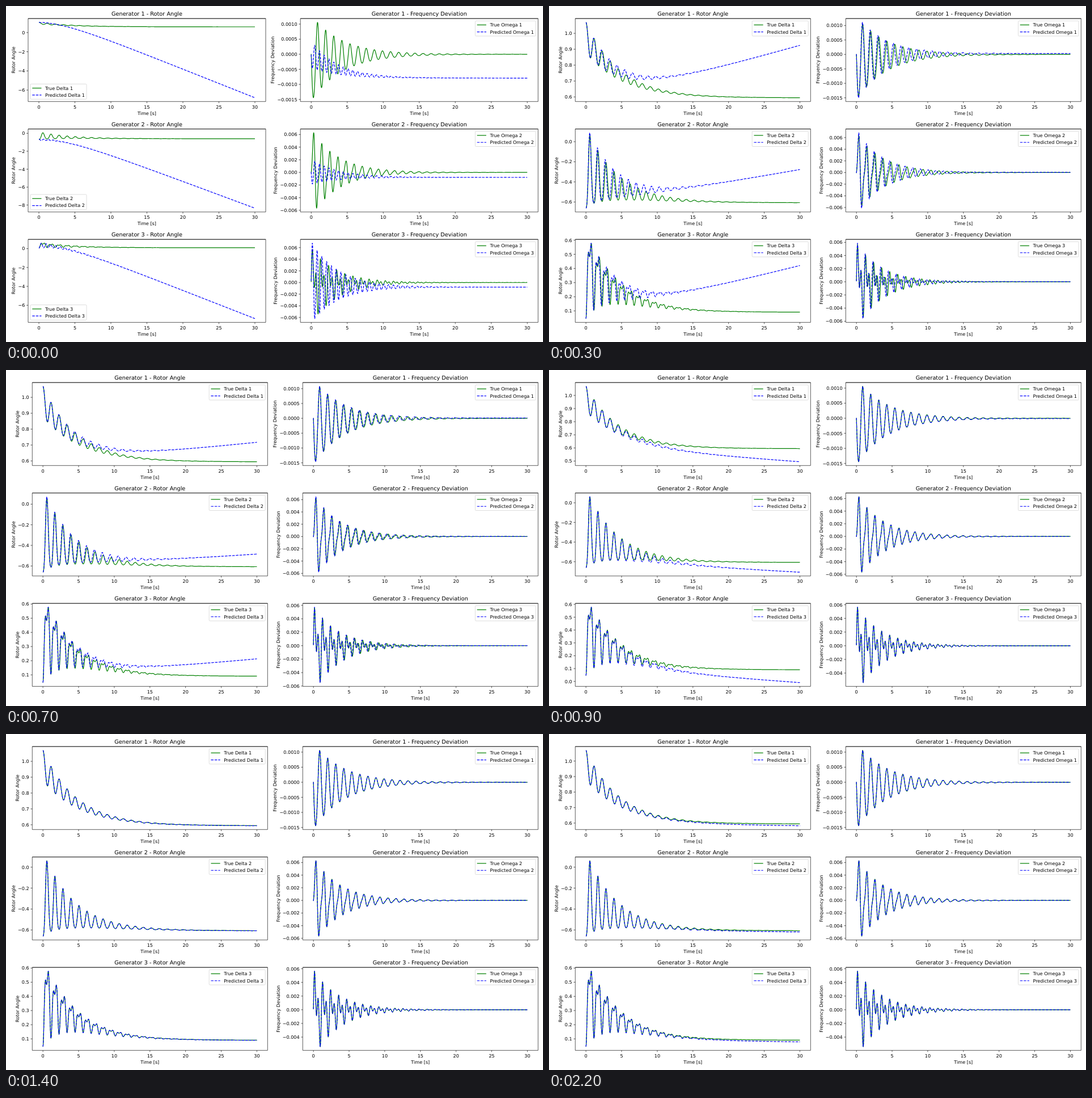
Write an HTML page with a canvas that moves like this. It is 947 by 592 pixels and loops after 7.2 s.

```html
<!DOCTYPE html>
<html lang="en">
<head>
<meta charset="utf-8">
<style>
  html, body { margin: 0; width: 100%; height: 100%; overflow: hidden; background: #fff; }
  canvas { display: block; }
</style>
</head>
<body>
<canvas id="stage" width="947" height="592"></canvas>
<script>
const ctx = document.getElementById('stage').getContext('2d');
const EM = 8.1, PT = 0.81, HEIGHT = 146.2, TOPS = [22.1, 216.7, 411.2];
const SPAN = 30, SAMPLES = 1000, SPEED = 377;
const W = 5.575;

// Damped terms: [amplitude, decay rate, frequency, phase]
const GENERATORS = [
  { rest: 0.594, gain: 0,
    real: [[0.38, 0.205, 0, 0], [0.097, 0.24, W, -0.25], [0.003, 0.24, 2 * W, 1.07]],
    rough: [[0.457, 0, 0, 0], [0.018, 0.27, 9.5, 0]] },
  { rest: -0.608, gain: 1,
    real: [[0.31, 0.185, 0, 0], [-0.4, 0.26, W, 0], [0.069, 0.32, 2 * W, 0.13], [-0.03, 1.5, 0, 0]],
    rough: [[0.11, 0, 0, 0], [-0.24, 0.2, 0, 0], [0.08, 0.27, 9.5, 0]] },
  { rest: 0.09, gain: 0,
    real: [[0.44, 0.21, 0, 0], [-0.117, 0.5, 0, 0], [-0.246, 0.29, W, -0.18], [-0.127, 0.27, 2 * W, 0.15]],
    rough: [[0.35, 0, 0, 0], [-0.12, 0.2, 0, 0], [-0.28, 0.27, 9.5, 0]] }
];

// Training progress: [step, drift at the end, tempo, share of the rough shape]
const KEYS = [
  [0, -7.85, 1.04, 1], [3, 0.33, 1.04, 0], [5, 0.345, 1.028, 0], [9, -0.1, 1, 0],
  [14, -0.001, 1, 0], [18, -0.064, 1, 0], [22, -0.012, 1, 0]
];

function progress(step) {
  const i = Math.max(1, KEYS.findIndex(k => k[0] >= step));
  const a = KEYS[i - 1], b = KEYS[i], u = (step - a[0]) / (b[0] - a[0]);
  return a.map((v, j) => v + (b[j] - v) * u);
}

const swing = (terms, t) => terms.reduce(
  (sum, [amp, rate, freq, phase]) => sum + amp * Math.exp(-rate * t) * Math.cos(freq * t + phase), 0);

// Drift that sets in gently and then grows linearly to 1 at the end
const LAG = 3.7;
const drift = t => (t - LAG * (1 - Math.exp(-t / LAG))) / (SPAN - LAG);

const slope = f => t => (f(t + 0.002) - f(t - 0.002)) / 0.004 / SPEED;
const sample = f => Array.from({ length: SAMPLES + 1 }, (_, i) => f(i * SPAN / SAMPLES));

function tickStep(range) {
  for (let e = -5; e < 3; e++)
    for (const m of [1, 2, 2.5, 5])
      if (range / (m * 10 ** e) <= 7.5)
        return { size: m * 10 ** e, decimals: Math.max(0, (m === 2.5 ? 1 : 0) - e) };
}

function makePanel(row, name, kind, real, guess) {
  const curves = [sample(real), sample(guess)];
  const all = curves.flat();
  let lo = Math.min(...all), hi = Math.max(...all);
  const pad = (hi - lo) * 0.05;
  lo -= pad;
  hi += pad;
  const { size, decimals } = tickStep(hi - lo);
  const ticks = [];
  for (let n = Math.ceil(lo / size); n <= hi / size; n++)
    ticks.push([n * size, (n < 0 ? '\u2212' : '') + Math.abs(n * size).toFixed(decimals)]);
  return { row, name, kind, curves, lo, hi, ticks, decimals };
}

function text(str, x, y, align = 'center', size = EM) {
  ctx.font = size + 'px "DejaVu Sans", sans-serif';
  ctx.textAlign = align;
  ctx.fillStyle = '#000';
  ctx.fillText(str, x, y);
}

function line(points, color, width, dashed) {
  ctx.strokeStyle = color;
  ctx.lineWidth = width;
  ctx.setLineDash(dashed ? [5.55 * PT, 2.4 * PT] : []);
  ctx.beginPath();
  points.forEach(([x, y]) => ctx.lineTo(x, y));
  ctx.stroke();
  ctx.setLineDash([]);
}

const curve = (points, second) => line(points, second ? '#00f' : '#008000', 1.5 * PT, second);
const thin = (...points) => line(points, '#000', 0.8 * PT);

function legend(panel, left, right, top, low) {
  const labels = ['True', 'Predicted'].map(w => `${w} ${panel.name} ${panel.row + 1}`);
  ctx.font = EM + 'px "DejaVu Sans", sans-serif';
  const w = ctx.measureText(labels[1]).width + 3.6 * EM, h = 26.8;
  const x = low ? left + 4.05 : right - 4.05 - w;
  const y = low ? top + HEIGHT - 4.05 - h : top + 4.05;
  ctx.beginPath();
  ctx.roundRect(x, y, w, h, 1.6);
  ctx.fillStyle = 'rgba(255,255,255,.8)';
  ctx.fill();
  ctx.strokeStyle = 'rgba(204,204,204,.8)';
  ctx.lineWidth = PT;
  ctx.stroke();
  labels.forEach((label, i) => {
    const ly = y + 7.2 + i * 12.3, lx = x + 0.4 * EM;
    curve([[lx, ly], [lx + 2 * EM, ly]], i === 1);
    text(label, lx + 2.8 * EM, ly + 2.85, 'left');
  });
}

function drawPanel(panel, left, right, low) {
  const top = TOPS[panel.row], bottom = top + HEIGHT, mid = (left + right) / 2;
  const px = t => left + (right - left) * (t / SPAN + 0.05) / 1.1;
  const py = v => bottom - HEIGHT * (v - panel.lo) / (panel.hi - panel.lo);

  panel.curves.forEach((data, i) =>
    curve(data.map((v, j) => [px(j * SPAN / SAMPLES), py(v)]), i === 1));
  thin([left, top], [right, top], [right, bottom], [left, bottom], [left, top], [right, top]);

  for (let t = 0; t <= SPAN; t += 5) {
    thin([px(t), bottom], [px(t), bottom + 3.5 * PT]);
    text(t, px(t), bottom + 12.2);
  }
  let widest = 0;
  for (const [v, label] of panel.ticks) {
    thin([left, py(v)], [left - 3.5 * PT, py(v)]);
    text(label, left - 7 * PT, py(v) + 3, 'right');
    widest = Math.max(widest, ctx.measureText(label).width);
  }

  text('Time [s]', mid, bottom + 23.4);
  text(`Generator ${panel.row + 1} - ${panel.kind}`, mid, top - 5, 'center', EM * 1.2);
  ctx.save();
  ctx.translate(left - 7 * PT - widest - 5.1, top + HEIGHT / 2);
  ctx.rotate(-Math.PI / 2);
  text(panel.kind, 0, 0);
  ctx.restore();
  legend(panel, left, right, top, low);
}

function draw(step) {
  const [, end, tempo, rough] = progress(step);
  const angles = [], speeds = [];
  GENERATORS.forEach((g, i) => {
    const real = t => g.rest + swing(g.real, t);
    const share = (1 - rough) * tempo ** g.gain;
    const guess = t => g.rest + end * drift(t)
      + share * swing(g.real, t * tempo) + rough * swing(g.rough, t);
    angles.push(makePanel(i, 'Delta', 'Rotor Angle', real, guess));
    speeds.push(makePanel(i, 'Omega', 'Frequency Deviation', slope(real), slope(guess)));
  });

  ctx.fillStyle = '#fff';
  ctx.fillRect(0, 0, 947, 592);
  ctx.textRendering = 'geometricPrecision';
  ctx.lineJoin = 'round';
  // Wider tick labels push the axes to the right
  const wide = angles.some(p => p.decimals > 0);
  angles.forEach(p => drawPanel(p, wide ? 46.3 : 39, wide ? 461.3 : 458, end < -1));
  speeds.forEach(p => drawPanel(p, wide ? 523.3 : 519.2, 938.3, false));
}

let shown = -1;
function tick(now) {
  const step = Math.min(22, Math.floor(now % 7200 / 100));
  if (step !== shown) draw(shown = step);
  requestAnimationFrame(tick);
}
tick(0);
</script>
</body>
</html>
```
